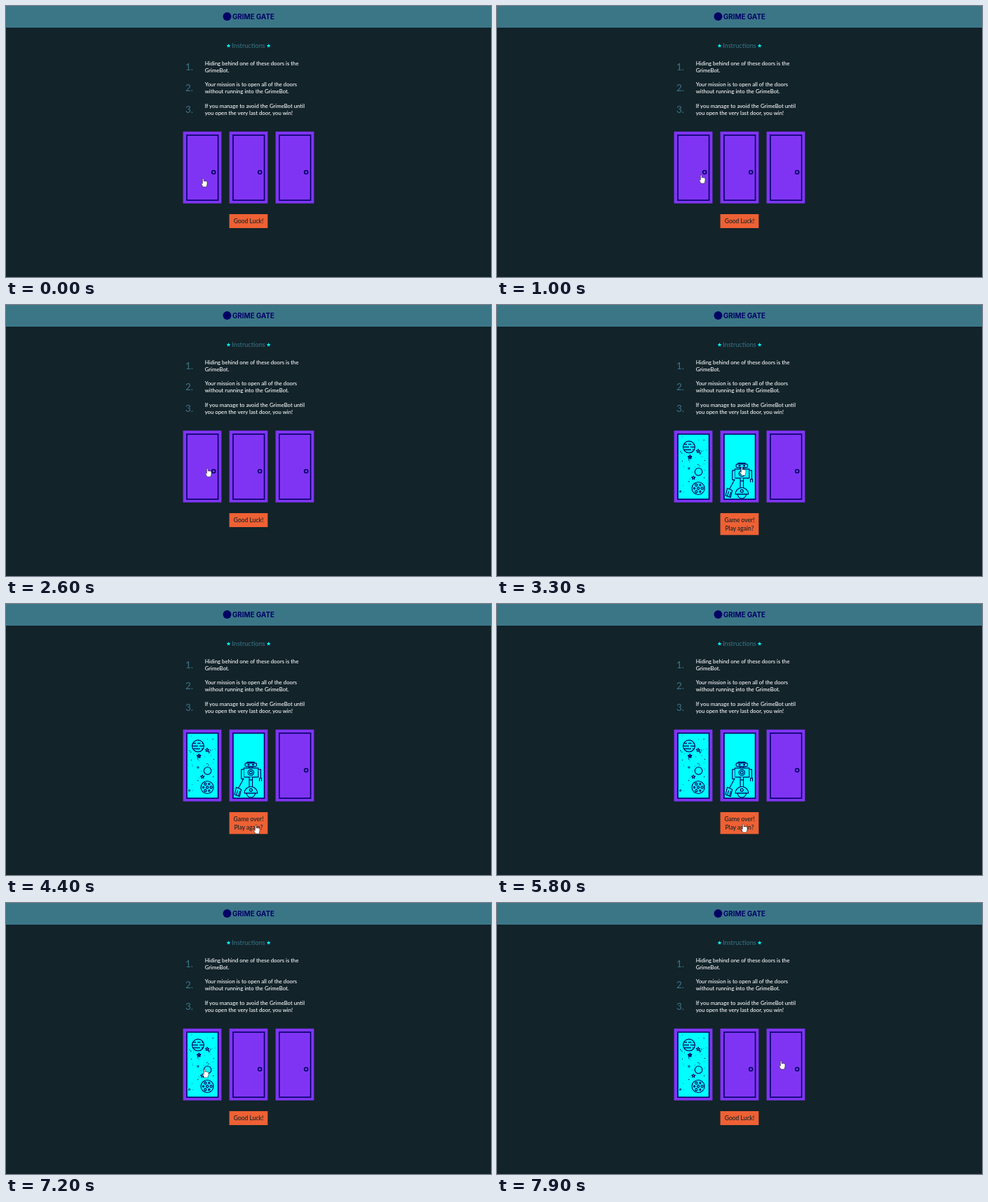
Recreate the animation shown at these times as an HTML page. Size 692 px wide and 388 px high, loop 8000 ms.

```html
<!DOCTYPE html>
<html lang="en">
<head>
<meta charset="utf-8">
<title>Door game</title>
<style>
  html, body { margin: 0; width: 100%; height: 100%; overflow: hidden; background: #12232a; }
  svg { display: block; width: 100%; height: 100%; }
  text { font-family: Lato, "Open Sans", sans-serif; }
  .brand { font: 700 9.8px Inter, "Open Sans", sans-serif; fill: #010165; }
  .heading { font-size: 9.2px; fill: #3b7687; }
  .number { font-size: 13.5px; fill: #3b7687; }
  .rule { font-size: 7.75px; font-weight: 500; fill: #fff; }
  .label { font-size: 8.5px; font-weight: 500; fill: #12232a; text-anchor: middle; }
  .line { fill: none; stroke: #010165; stroke-width: 1.15; stroke-linejoin: round; }
  .cyan { fill: #0ff; }
  .ink { fill: #010165; }
  .thick { stroke-width: 1.6; stroke-linejoin: miter; }
</style>
</head>
<body>
<svg viewBox="0 0 692 388">
  <defs>
    <path id="star" d="M0-3 .8-1 2.9-.9 1.3.4 1.8 2.4 0 1.3-1.8 2.4-1.3.4-2.9-.9-.8-1Z"/>
    <g id="frame">
      <rect width="54.8" height="102.8" fill="#8034f3"/>
      <rect class="line thick" style="fill: inherit" x="5.4" y="5.1" width="44.6" height="93.2"/>
    </g>
    <g id="closed">
      <use href="#frame" fill="none"/>
      <circle class="line thick" cx="43.6" cy="58.2" r="2.5"/>
    </g>
    <g id="space">
      <use href="#frame" fill="#0ff"/>
      <g id="sky" class="line"></g>
    </g>
    <g id="robot">
      <use href="#frame" fill="#0ff"/>
      <g class="line cyan">
        <path d="M25.5 46.5h10l1 3h-12Z"/>
        <rect x="22.5" y="48" width="16.5" height="4.8" rx="1.5"/>
        <path d="M28 53h5.500v2H28Z"/>
        <rect x="20.800" y="55" width="20.500" height="13"/>
        <circle cx="30.800" cy="61.500" r="4.200"/>
        <circle cx="30.800" cy="61.500" r="2"/>
        <path d="M20.800 57h-3.600v13.500h3.600M41.300 57h3.600v12.500M43 74v-4.500h3V74"/>
        <path d="M28.500 68v16H33V68M28.500 72H33"/>
        <path d="M20.500 70 13 84M10 82.500l7 3.300-2.300 10L7.500 93ZM10 94l2-7m1 8 2-7"/>
        <path d="M21.500 91a9.300 9.300 0 0 1 18.600 0Z"/>
        <path d="M24.600 91a6.200 6.200 0 0 0 12.400 0Z"/>
        <circle cx="30.800" cy="86.500" r="2"/>
      </g>
      <g class="ink">
        <circle cx="27.500" cy="50.400" r="1.400"/>
        <circle cx="34" cy="50.400" r="1.400"/>
      </g>
    </g>
  </defs>

  <rect width="692" height="31" fill="#3b7687"/>
  <circle cx="315.500" cy="15" r="6" fill="#010165"/>
  <text class="brand" x="323" y="19">GRIME GATE</text>

  <use href="#star" x="317.500" y="57" fill="#0ff"/>
  <text class="heading" x="322" y="59.700">Instructions</text>
  <use href="#star" x="374.700" y="57" fill="#0ff"/>
  <g id="rules"></g>
  <g id="doors"></g>

  <rect id="button" x="318.600" y="298" width="54.800" fill="#ee6134"/>
  <text id="label1" class="label" x="346" y="311.300"></text>
  <text id="label2" class="label" x="346" y="323.300"></text>

  <path id="cursor" fill="#fff" stroke="#111" stroke-width=".5"/>
</svg>
<script>
const $ = id => document.getElementById(id);

function add(parent, tag, attrs, text = '') {
  const node = document.createElementNS('http://www.w3.org/2000/svg', tag);
  for (const key in attrs) node.setAttribute(key, attrs[key]);
  node.textContent = text;
  parent.append(node);
  return node;
}

const circle = (cx, cy, r, cls = 'cyan') => add($('sky'), 'circle', { cx, cy, r, class: cls });

[
  ['Hiding behind one of these doors is the', 'GrimeBot.'],
  ['Your mission is to open all of the doors', 'without running into the GrimeBot.'],
  ['If you manage to avoid the GrimeBot until', 'you open the very last door, you win!']
].forEach((lines, i) => {
  const y = 84.8 + i * 30.4;
  add($('rules'), 'text', { class: 'number', x: 256, y: y + 7.2 }, `${i + 1}.`);
  lines.forEach((line, j) => add($('rules'), 'text', { class: 'rule', x: 283.7, y: y + j * 10.2 }, line));
});

const DOOR_LEFT = 252.6, DOOR_GAP = 66, DOOR_WIDTH = 54.8;
const doors = [0, 1, 2].map(i =>
  add($('doors'), 'use', { href: '#closed', x: DOOR_LEFT + i * DOOR_GAP, y: 179.8 }));

function paintSky() {
  const planets = [{ x: 21.4, y: 23.5, r: 8.4 }, { x: 35, y: 59, r: 5.3 }, { x: 34.5, y: 82.7, r: 9 }];
  let seed = 7;
  const random = () => (seed = seed * 16807 % 2147483647) / 2147483647;

  for (let i = 0; i < 60; i++) {
    const x = 9 + 37 * random(), y = 9 + 85 * random();
    if (planets.some(p => Math.hypot(x - p.x, y - p.y) < p.r + 3)) continue;
    if (i % 5) circle(x, y, i % 3 ? .2 : .5, 'ink').setAttribute('stroke-width', .4);
    else add($('sky'), 'use', { href: '#star', transform: `translate(${x} ${y}) scale(${i % 2 ? .9 : .55})` });
  }

  planets.forEach(p => circle(p.x, p.y, p.r));
  const [striped, , cratered] = planets;
  for (let i = -1; i <= 1; i++) {
    const half = Math.sqrt(striped.r ** 2 - (i * 4) ** 2);
    add($('sky'), 'path', {
      d: `M${striped.x - half} ${striped.y + i * 4}h${half * 2}`,
      'stroke-dasharray': `${half * (1 + i * .4)} 2`
    });
  }
  for (let i = 0; i < 7; i++) {
    const angle = i * Math.PI / 3, d = i < 6 ? 5.5 : 0;
    circle(cratered.x + d * Math.cos(angle), cratered.y + d * Math.sin(angle), i % 2 ? 1.1 : 1.6);
  }
}
paintSky();

const LOOP = 8000, STEP = 100;
const FIRST_OPEN = 2700, GAME_OVER = 3300, RESET = 6000, REOPEN = 7200;
const HAND = 'M-2.600 1.400V-5a.9.9 0 0 1 1.800 0V-2a.9.9 0 0 1 1.700 0a.9.9 0 0 1 1.600.3a.8.8 0 0 1 1.500.5V2L3 6H-2L-4.400 1.600Q-4.400 0-2.600 1.400Z';
const ARROW = 'M-2-6V4L.2 2L1.800 5.600L3.200 5L1.600 1.600H4.600Z';

// Each move: start, end, then the point it reaches; the cursor rests in between.
const home = [283, 253];
const moves = [
  [100, 600, 293, 248],
  [1700, 2100, 327, 228],
  [2100, 2500, 289, 240],
  [3100, 3300, 351, 238],
  [3500, 4000, 353, 347],
  [4100, 4400, 358, 323],
  [4500, 5700, 353, 321],
  [6000, 6400, 285, 244],
  [7300, 7700, 407, 232]
];

function cursorAt(t) {
  let [x, y] = home;
  for (const [from, to, toX, toY] of moves) {
    const u = Math.min(1, Math.max(0, (t - from) / (to - from)));
    const k = u * u * (3 - 2 * u);
    x += (toX - x) * k;
    y += (toY - y) * k;
  }
  return [x, y];
}

function draw(now) {
  const t = Math.floor(now % LOOP / STEP) * STEP;
  const over = t >= GAME_OVER && t < RESET;
  const firstOpen = (t >= FIRST_OPEN && t < RESET) || t >= REOPEN;
  const buttonHeight = over ? 31.3 : 20;

  doors[0].setAttribute('href', firstOpen ? '#space' : '#closed');
  doors[1].setAttribute('href', over ? '#robot' : '#closed');
  $('button').setAttribute('height', buttonHeight);
  $('label1').textContent = over ? 'Game over!' : 'Good Luck!';
  $('label2').textContent = over ? 'Play again?' : '';

  const [x, y] = cursorAt(t);
  const onDoor = (x - DOOR_LEFT) % DOOR_GAP < DOOR_WIDTH && y < 288;
  const onButton = Math.abs(x - 346) < 27.4 && y > 298 && y < 302 + buttonHeight;
  $('cursor').setAttribute('d', onDoor || onButton ? HAND : ARROW);
  $('cursor').setAttribute('transform', `translate(${x} ${y})`);
}

const start = performance.now();
function tick() {
  draw(performance.now() - start);
  requestAnimationFrame(tick);
}
tick();
</script>
</body>
</html>
```
